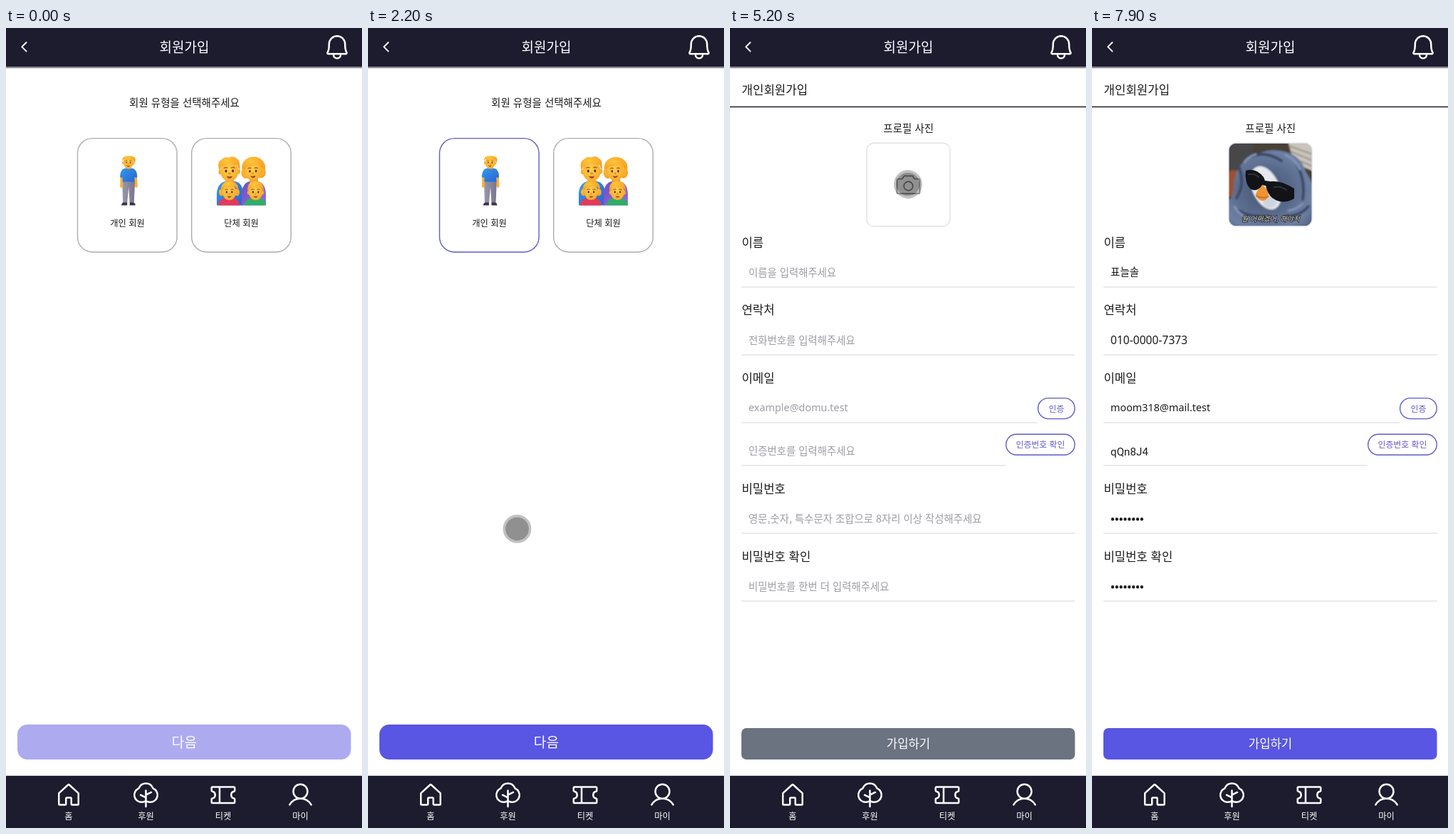
Recreate the animation shown at these times as an HTML page. Size 500 by 1121 pixels, loop 8000 ms.

```html
<!DOCTYPE html>
<html lang="ko">
<head>
<meta charset="utf-8">
<title>회원가입</title>
<style>
  html, body { margin: 0; width: 100%; height: 100%; overflow: hidden; background: #fff; }
  svg { display: block; width: 100%; height: 100%; }
  text { font-family: "Noto Sans CJK KR", "Noto Sans CJK", sans-serif; white-space: pre; }
  .latin { font-family: "Noto Sans", "Noto Sans CJK KR", sans-serif; }
  .code { font-family: Roboto, "Noto Sans", sans-serif; }
  .line { fill: none; stroke: #fff; stroke-linecap: round; stroke-linejoin: round; }
</style>
</head>
<body>
<svg id="stage" viewBox="0 0 500 1121">
  <defs>
    <radialGradient id="skin" cx=".45" cy=".4" r=".65">
      <stop offset="0" stop-color="#ffd04a"/><stop offset="1" stop-color="#f7a92c"/>
    </radialGradient>
    <radialGradient id="hair" cx=".4" cy=".3" r=".75">
      <stop offset="0" stop-color="#ffc63a"/><stop offset="1" stop-color="#f59a22"/>
    </radialGradient>
    <linearGradient id="blue" x2="1" y2="1">
      <stop offset="0" stop-color="#2f9bee"/><stop offset="1" stop-color="#2b62cf"/>
    </linearGradient>
    <linearGradient id="purple" x2="1" y2="1">
      <stop offset="0" stop-color="#6a4fc4"/><stop offset="1" stop-color="#9a6bdc"/>
    </linearGradient>
    <linearGradient id="trousers" x2="1">
      <stop offset="0" stop-color="#9a98ab"/><stop offset="1" stop-color="#77758c"/>
    </linearGradient>
    <radialGradient id="towel" cx=".45" cy=".5" r=".62">
      <stop offset="0" stop-color="#43526f"/><stop offset=".5" stop-color="#5a6c8e"/>
      <stop offset=".8" stop-color="#6d80a3"/><stop offset="1" stop-color="#536485"/>
    </radialGradient>
    <filter id="soft"><feGaussianBlur stdDeviation="1.2"/></filter>
    <clipPath id="photoClip"><rect x="192" y="161.5" width="117" height="116" rx="10"/></clipPath>
    <clipPath id="familyClip"><rect x="290" y="175" width="80" height="73.5"/></clipPath>
  </defs>

  <rect width="500" height="1121" fill="#fff"/>
  <g id="choose"></g>
  <g id="form"></g>
  <g id="bars"></g>

  <g id="cursor">
    <circle r="16.5" fill="#000" fill-opacity=".435"/>
    <circle r="18.2" fill="none" stroke="#646464" stroke-opacity=".4" stroke-width="3.4"/>
  </g>
</svg>

<script>
const $ = id => document.getElementById(id);
const ACCENT = '#5856e2', OUTLINE = '#5f5bca', DARK = '#1d1b2e', HINT = '#9c9ca4', INK = '#1c1c1f';

// Text whose glyphs are centred vertically on cy.
const text = (x, cy, size, str, fill = INK, anchor = 'start', extra = '') =>
  `<text x="${x}" y="${cy + size * 0.37}" font-size="${size}" fill="${fill}" text-anchor="${anchor}" ${extra}>${str}</text>`;
const mid = (x, cy, size, str, fill) => text(x, cy, size, str, fill, 'middle');
const box = (x, y, w, h, r, fill, extra = '') =>
  `<rect x="${x}" y="${y}" width="${w}" height="${h}" rx="${r}" fill="${fill}" ${extra}/>`;
const path = (d, extra = '') => `<path d="${d}" ${extra}/>`;
const oval = (x, y, rx, ry, fill, extra = '') =>
  `<ellipse cx="${x}" cy="${y}" rx="${rx}" ry="${ry}" fill="${fill}" ${extra}/>`;
// Icons live on a 256 unit grid, shown 40 pixels wide around cx.
const icon = (cx, top, d) =>
  path(d, `class="line" stroke-width="16" transform="translate(${cx - 20} ${top}) scale(.15625)"`);

// Face in units of its radius.
const face = (x, y, r) => `<g transform="translate(${x} ${y}) scale(${r})">
  ${oval(-0.95, 0.08, 0.2, 0.26, '#f7ab30')}${oval(0.95, 0.08, 0.2, 0.26, '#f7ab30')}
  ${oval(0, 0, 0.95, 1.1, 'url(#skin)')}
  ${oval(-0.36, 0, 0.11, 0.15, '#4f2a2c')}${oval(0.36, 0, 0.11, 0.15, '#4f2a2c')}
  ${path('M-.58-.3q.2-.16 .4-.02M.18-.32q.2-.14 .4 .02', 'fill="none" stroke="#b4601e" stroke-width=".12"')}
  ${oval(0, 0.26, 0.15, 0.11, '#f08a24')}
  ${path('M-.3 .52q.3 .12 .6 0q-.08 .26-.3 .26t-.3-.26z', 'fill="#a0402f"')}</g>`;

function drawPerson() {
  return `<g id="body">
    ${path('M163 214h18l-1.500 31h-6l-1.500-22-2 22h-6z', 'fill="url(#trousers)"')}
    ${path('M162 248.500q0-4 4-4h4v4zM173.500 248.500v-4h4q4 0 4 4z', 'fill="#3d304c"')}
    ${path('M162.500 204L161.800 222M182 204L182.700 222', 'fill="none" stroke="#f9b033" stroke-width="3.600" stroke-linecap="round"')}
    ${box(168.500, 193, 7, 7, 2, '#f3a029')}
    ${path('M168 196.500q4.500 2.500 8 0q8 .5 8 13h-3.500v6h-17v-6h-3.500q0-12.500 8-13z', 'fill="url(#blue)"')}
  </g>
  <g id="head">
    ${face(171, 188.500, 7.600)}
    ${path('M162.500 187q-1-7 6-7.500q11-1 12 3t-1 6q-1-4-4-4.500-6 1-10-.5-2 1-3 3.500z', 'fill="url(#hair)"')}
  </g>`;
}

function drawFamily() {
  return `<g clip-path="url(#familyClip)">
    ${path('M296 249v-17q1-18 19-18t18 18v17z', 'fill="url(#blue)"')}
    ${path('M331 249v-17q1-18 17-18t17 18v17z', 'fill="url(#purple)"')}
    <g id="adults">
      ${box(309, 210, 12, 10, 4, '#f3a029')}
      ${oval(349, 196, 16.500, 15, 'url(#hair)')}
      ${oval(338, 203, 6.500, 8, 'url(#hair)')}${oval(359.500, 203, 6.500, 8, 'url(#hair)')}
      ${box(343, 210, 12, 10, 4, '#f3a029')}
      ${face(315, 200, 13.300)}
      ${path('M301 199q-4-12 4-16 4-4 10-2 7-3 11 2 5 2 3.500 16-2-2-3-7-9-2-13-3-6 4-9 3-2 3-3.500 7z', 'fill="url(#hair)"')}
      ${face(348, 201, 12)}
      ${path('M335 200q-2-16 13-18 16 1 14 18-2-7-8-10-8 5-14 4-3 2-5 6z', 'fill="url(#hair)"')}
    </g>
    ${path('M298 249q0-11 15-11t15 11z', 'fill="#e5395a"')}
    ${path('M335 249q0-11 15-11t15 11z', 'fill="#2fae68"')}
    <g id="kids">
      ${oval(302, 230, 3.500, 5, 'url(#hair)')}${oval(324, 230, 3.500, 5, 'url(#hair)')}
      ${face(313, 229.500, 10.300)}
      ${path('M301.500 229q-2-14 12-15 14 1 12 15-2-6-6-8-8 3-12 1-4 2-6 7z', 'fill="url(#hair)"')}
      ${face(350, 229.500, 10.300)}
      ${path('M339 229q-2-13 9-15 14-1 13.500 15-2-3-3-6-8 0-12-2-5 4-7.500 8z', 'fill="url(#hair)"')}
    </g></g>`;
}

function drawChoose() {
  const card = 'stroke-width="1.4" stroke="#acacac"';
  return mid(250.5, 105, 14.5, '회원 유형을 선택해주세요') +
    box(100.5, 154.6, 139.6, 159.4, 21, '#fff', card + ' id="single"') +
    box(260.7, 154.6, 139.6, 159.4, 21, '#fff', card) +
    drawPerson() + drawFamily() +
    mid(170.5, 273, 12.3, '개인 회원') + mid(330.5, 273, 12.3, '단체 회원') +
    box(16, 976, 468.5, 49, 14, '#aeaaf0', 'id="next"') +
    mid(250.5, 1001, 19.2, '다음', '#fff');
}

function drawPhoto() {
  const stroke = (color, width) =>
    `fill="none" stroke="${color}" stroke-width="${width}" stroke-linecap="round"`;
  return `<g clip-path="url(#photoClip)">
    <g filter="url(#soft)">
      ${box(186, 155, 130, 130, 0, '#4a4039')}
      ${box(186, 155, 40, 45, 0, '#47474a')}
      ${path('M274 155h42v48l-32-14z', 'fill="#c9c4bc"')}
      ${path('M279 166l34 12M279 173l34 14M281 182l32 13', stroke('#98928b', 2))}
      ${path('M186 206q8-9 18-6l-4 36h-14z', 'fill="#9c5132"')}
      ${path('M186 285v-40q14-5 13-25 3-32 27-39 18-14 44-8 24 6 30 28 9 14 16 34v50z', 'fill="url(#towel)"')}
      ${path('M207 196q8 24-4 42M224 180q20-8 42 6M288 192q12 22 8 48M206 256q18 10 42 8M304 250q-12 14-32 14', stroke('#3c4a66', 4))}
      ${path('M214 188q6-8 16-11M272 178q14 6 20 20M200 250q6 12 20 16M276 256q12-2 20-10', stroke('#8394b5', 3))}
      ${oval(244, 224, 19, 32, '#e6e9ef', 'transform="rotate(-24 244 224)"')}
      ${oval(250, 243, 10, 9, '#cdd4e0')}
    </g>
    ${path('M239 220q7 4 9 14-2 9-10 8-8-3-8-9 3-8 9-13z', 'fill="#ee9432"')}
    ${path('M231 235q8 5 17 1', stroke('#c46f1c', 1.5))}
    ${path('M216 200q14-5 25 9l2 5 8 1q14-2 33 10v14q-18 10-32-2-6-6-8-16l-5-1q-6 10-16 6-9-8-7-26z', 'fill="#121317"')}
    ${path('M220 205q8-2 14 4M256 223q10-2 17 4', stroke('#30333a', 2))}
    ${text(251, 267, 10, '뭘 어쩌겠어, 해야지', '#dcdcdc', 'middle', 'font-style="italic" stroke="#222" stroke-width="1.5" paint-order="stroke"')}
  </g>${box(192, 161.2, 117, 116.6, 10, 'none', 'stroke="#dedee4" stroke-width="1.3"')}`;
}

// label, label y, value y, underline y, underline end, hint, value, value size
const fields = [
  ['이름', 301, 343, 363, 484.5, '이름을 입력해주세요', '표늘솔', 14.6],
  ['연락처', 395, 437.5, 458, 484.5, '전화번호를 입력해주세요', '010-0000-7373', 15.6],
  ['이메일', 490.5, 532, 553, 432, 'example@domu.test', 'moom318@mail.test', 14.4],
  ['', 0, 593, 613, 387, '인증번호를 입력해주세요', 'qQn8J4', 15.2],
  ['비밀번호', 646, 687.5, 708, 484.5, '영문,숫자, 특수문자 조합으로 8자리 이상 작성해주세요', '', 0],
  ['비밀번호 확인', 741, 782.5, 803, 484.5, '비밀번호를 한번 더 입력해주세요', '', 0],
];

const dots = y => path(`M29 ${y + 0.7}H70.5`,
  `stroke="${INK}" stroke-width="4.4" stroke-linecap="round" stroke-dasharray="0 5.85"`);

function drawForm() {
  const pill = (x, y, w, label) =>
    box(x, y, w, 29, 14.5, '#fff', `stroke="${OUTLINE}" stroke-width="1.4"`) +
    mid(x + w / 2, y + 14.7, 11.9, label, OUTLINE);
  let base = '', hints = '', values = '';
  for (const [label, ly, vy, line, end, hint, value, size] of fields) {
    base += text(16.5, ly, 16.7, label) +
      path(`M16 ${line}H${end}`, 'stroke="#e3e3e7" stroke-width="1.5"');
    hints += text(26, vy, 14.4, hint, HINT, 'start', hint[0] === 'e' ? 'class="latin"' : '');
    const kind = value[0] === 'q' ? 'class="code"' : /^[a-z0-9]/.test(value) ? 'class="latin"' : '';
    const id = value.includes('@') ? ' id="email"' : '';
    values += value ? text(26, label === '이름' ? vy - 1.5 : vy, size, value, INK, 'start', kind + id) : dots(vy);
  }
  return text(16.5, 87, 16.8, '개인회원가입') +
    path('M0 110.500H500', `stroke="${DARK}" stroke-width="1.4"`) +
    mid(250.7, 141, 14.5, '프로필 사진') + base +
    `<g id="empty">
      ${box(192, 161.2, 117, 116.6, 10, '#fff', 'stroke="#e2e2e5" stroke-width="1.4"')}
      ${path('M235.500 211.500h6.500l2.500-4.200h12l2.500 4.200h6.500q1 0 1 1v18.500q0 1-1 1h-30q-1 0-1-1v-18.500q0-1 1-1z', 'fill="none" stroke="#808084" stroke-width="1.7"')}
      <circle cx="250.5" cy="221.5" r="6.3" fill="none" stroke="#808084" stroke-width="1.7"/>
      ${hints}</g>
    <g id="filled">${drawPhoto()}<rect id="mark" x="26" y="522" width="141" height="20" fill="#c8c8c8"/>${values}</g>` +
    pill(432.6, 518.6, 51.6, '인증') + pill(387.7, 569.3, 96.5, '인증번호 확인') +
    box(16, 981, 468.5, 44, 7, '#6b7280', 'id="join"') +
    mid(250.5, 1003.3, 16.7, '가입하기', '#fff');
}

const bell = 'M56 104a72 72 0 0 1 72-72c40 0 72 33 72 73v7c0 36 7.500 56.600 14 68a8 8 0 0 1-7 12H49a8 8 0 0 1-7-12c6.600-11.400 14-32 14-68ZM96 192v8a32 32 0 0 0 64 0v-8';
const tabs = [
  ['홈', 88, 'M152 208v-48a8 8 0 0 0-8-8h-32a8 8 0 0 0-8 8v48a8 8 0 0 1-8 8H48a8 8 0 0 1-8-8v-92.500a8 8 0 0 1 2.600-5.900l80-72.700a8 8 0 0 1 10.800 0l80 72.700a8 8 0 0 1 2.600 5.900V208a8 8 0 0 1-8 8h-48a8 8 0 0 1-8-8Z'],
  ['후원', 196.5, 'M128 181.500A64 64 0 0 1 86 192A64 64 0 0 1 61 70Q64 69 65 66A68 68 0 0 1 191 66Q192 69 195 70A64 64 0 0 1 170 192A64 64 0 0 1 128 181.500M128 88V232M128 128L176 104M128 152L80 128'],
  ['티켓', 305, 'M24 167V192a8 8 0 0 0 8 8H224a8 8 0 0 0 8-8V167a8 8 0 0 0-6.400-7.700a32 32 0 0 1 0-62.600a8 8 0 0 0 6.400-7.700V64a8 8 0 0 0-8-8H32a8 8 0 0 0-8 8V89a8 8 0 0 0 6.400 7.700a32 32 0 0 1 0 62.600a8 8 0 0 0-6.400 7.700ZM96 56V200'],
  ['마이', 413.5, 'M192 96a64 64 0 0 1-128 0a64 64 0 0 1 128 0ZM31 216a112 112 0 0 1 194 0'],
];

function drawBars() {
  return box(0, 0, 500, 54.5, 0, DARK) + box(0, 54.5, 500, 1.8, 0, '#85848c') +
    box(0, 1047, 500, 1, 0, '#d5d5da') + box(0, 1048, 500, 73, 0, DARK) +
    mid(250.5, 27, 19, '회원가입', '#fff') +
    path('M28.500 20.200L22.300 26.400L28.500 32.600', 'class="line" stroke-width="2"') +
    icon(465, 6.3, bell) +
    tabs.map(([label, x, d]) => icon(x, 1054.7, d) + mid(x, 1104, 12.3, label, '#fff')).join('');
}

$('choose').innerHTML = drawChoose();
$('form').innerHTML = drawForm();
$('bars').innerHTML = drawBars();

const LOOP = 8000, STEP = 100;
const PICK = 1400, OPEN = 3000, FILL = 5800, UNMARK = 7300;
// time, x, y
const track = [
  [400, 318, 440], [800, 305, 401], [1300, 167, 231], [1800, 167, 231],
  [2500, 237, 1007.5], [3000, 237, 1007.5], [3600, 237, 191], [4100, 250, 219], [5700, 250, 219],
  [5800, 250, 545], [6400, 250, 545], [7100, 250, 903], [7500, 250, 903],
];

function cursorAt(t) {
  const i = track.findIndex(k => k[0] > t);
  if (i < 1) return null;
  const a = track[i - 1], b = track[i];
  const u = (t - a[0]) / (b[0] - a[0]), e = u * u * (3 - 2 * u);
  return [1, 2].map(n => a[n] + (b[n] - a[n]) * e);
}

const show = (id, on) => $(id).setAttribute('display', on ? 'inline' : 'none');
const paint = (id, name, value) => $(id).setAttribute(name, value);

function render(t) {
  show('choose', t < OPEN);
  show('form', t >= OPEN);
  show('empty', t < FILL);
  show('filled', t >= FILL);
  show('mark', t < UNMARK);
  paint('email', 'fill', t < UNMARK ? '#4a4a4e' : INK);
  paint('single', 'stroke', t < PICK ? '#acacac' : OUTLINE);
  paint('next', 'fill', t < PICK ? '#aeaaf0' : ACCENT);
  paint('join', 'fill', t < FILL ? '#6b7280' : ACCENT);

  const sway = Math.cos(t / 2500 * 2 * Math.PI);
  paint('body', 'transform', `translate(${sway - 0.8} 0)`);
  paint('head', 'transform', `translate(${sway * 0.7 - 0.3} 0) rotate(${sway * 3} 171 197)`);
  paint('adults', 'transform', `translate(${-sway * 0.7} 0) rotate(${-sway * 1.5} 332 220)`);
  paint('kids', 'transform', `translate(${sway * 0.6} ${sway * 0.4})`);

  const c = cursorAt(t);
  show('cursor', c);
  if (c) paint('cursor', 'transform', `translate(${c[0]} ${c[1]})`);
}

paint('mark', 'width', $('email').getComputedTextLength() || 141);
const start = performance.now();
function tick() {
  const t = (performance.now() - start) % LOOP;
  render(Math.floor(t / STEP) * STEP);
  requestAnimationFrame(tick);
}
tick();
</script>
</body>
</html>
```
